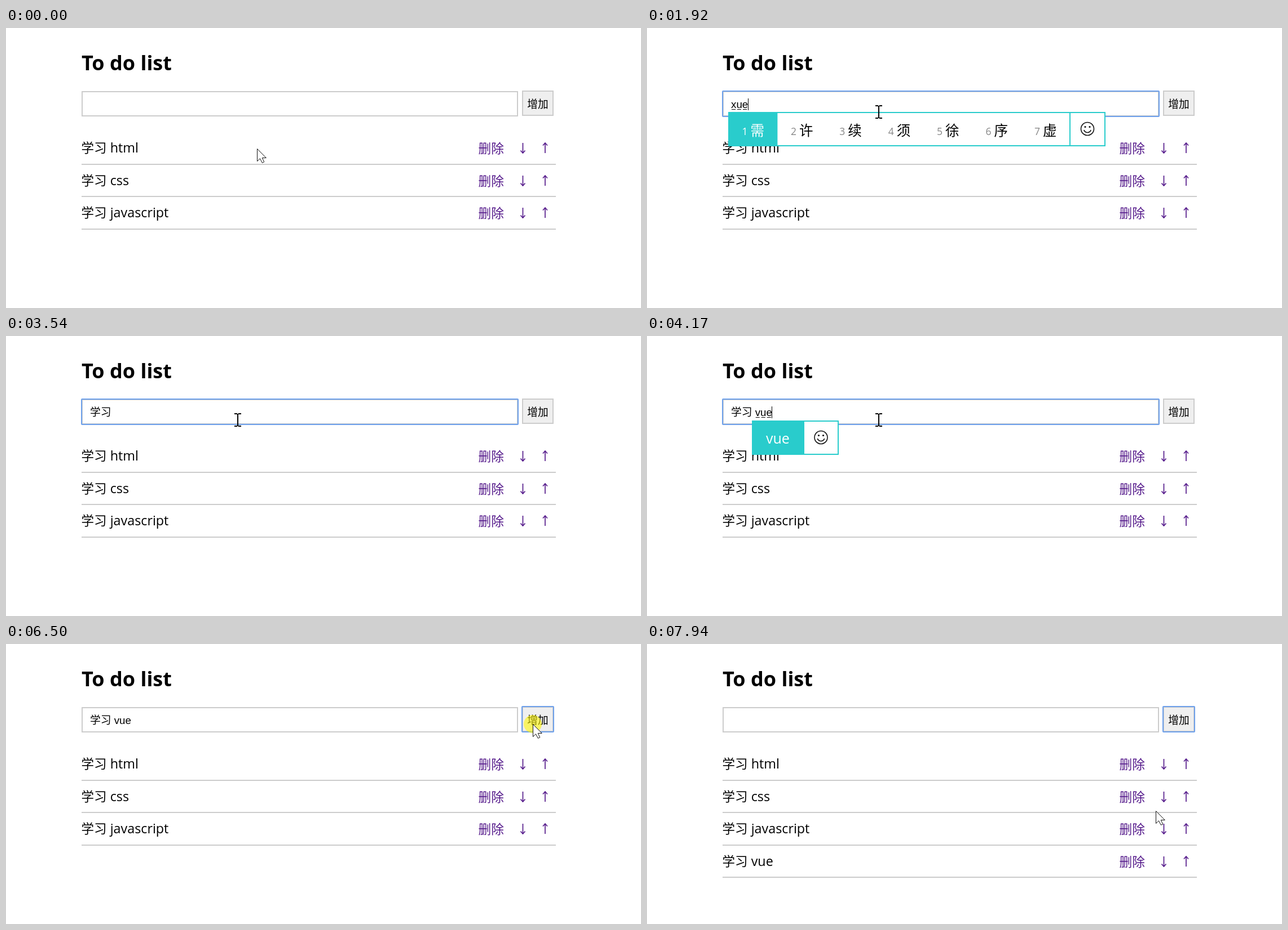
An HTML page with a canvas for the animation above (8 s loop, 1126 by 497 pixels).

```html
<!DOCTYPE html>
<html lang="zh-CN">
<head>
<meta charset="utf-8">
<title>To do list</title>
<style>
  html, body { margin: 0; width: 100%; height: 100%; overflow: hidden; background: #fff; }
  canvas { display: block; }
</style>
</head>
<body>
<canvas id="stage" width="1126" height="497"></canvas>
<script>
const ctx = document.getElementById('stage').getContext('2d');
const LOOP = 8000;
const TEAL = '#29cccc', GREY = '#cccccc', FOCUS = '#6ea1ec', LINK = '#551a8b';
const CJK = '"Noto Sans CJK SC", "Noto Sans CJK", sans-serif';
const UI = `"Open Sans", ${CJK}`;
const FIELD = `"Liberation Sans", ${CJK}`;

// Field contents: start time, committed text, text being composed, caret visible
const FIELD_STATES = [
  [0, '', '', false], [720, '', '', true], [1180, '', 'x', true],
  [1750, '', 'xu', true], [1910, '', 'xue', true],
  [2065, '', "xue'x", true], [2220, '', "xue'xi", true],
  [2680, '学习', '', true], [3040, '学习 ', '', true], [3540, '学习 ', '', false],
  [3730, '学习 ', 'v', true], [3900, '学习 ', 'vu', true], [4080, '学习 ', 'vue', true],
  [4370, '学习 vue', '', true], [4920, '学习 vue', '', false],
  [5410, '学习 vue', '', true], [5940, '学习 vue', '', false], [6610, '', '', false],
];

const POPUPS = [
  [0, null],
  [1250, () => candidates('想 下 小 新 行 学 向')],
  [1830, () => candidates('需 许 续 须 徐 序 虚')],
  [1985, () => candidates('学 血 雪 削 薛 穴 靴')],
  [2145, () => candidates('学习 学校 学些 学下 血型 学线 雪乡')],
  [2300, () => candidates('学习 学系 血洗 学 许额 薛 血')],
  [2680, null],
  [3800, modeHint],
  [3970, () => latinCandidate('vu')],
  [4170, () => latinCandidate('vue')],
  [4370, null],
];

// Pointer strokes: start, end, steps, from, control, to
const MOVES = [
  [60, 430, 7, [445, 214], [428, 188], [411, 149]],
  [5660, 6180, 9, [411, 149], [780, 88], [934, 142]],
  [6920, 7680, 13, [934, 142], [842, 258], [870, 263]],
  [7750, 7940, 4, [870, 263], [896, 303], [902, 296]],
];

const current = (states, t) => states.filter(s => s[0] <= t).pop();

function text(str, x, y, font, color = '#000', align = 'left') {
  ctx.font = font;
  ctx.fillStyle = color;
  ctx.textAlign = align;
  ctx.fillText(str, x, y);
  return ctx.measureText(str).width;
}

function box(x, y, w, h, color, fill) {
  if (fill) {
    ctx.fillStyle = fill;
    ctx.fillRect(x, y, w, h);
  }
  ctx.strokeStyle = color;
  ctx.lineWidth = 2;
  ctx.strokeRect(x + 1, y + 1, w - 2, h - 2);
}

function focusRing(x, y, w, h) {
  ctx.strokeStyle = FOCUS;
  ctx.lineWidth = 2;
  ctx.beginPath();
  ctx.roundRect(x + 1, y + 1, w - 2, h - 2, 1);
  ctx.stroke();
}

function polyline(points, close) {
  ctx.beginPath();
  points.forEach(([x, y]) => ctx.lineTo(x, y));
  if (close) ctx.closePath();
}

function arrowLink(x, y, dir) {
  ctx.strokeStyle = LINK;
  ctx.lineWidth = 1.7;
  polyline([[x, y - 9 * dir], [x, y + 9 * dir]]);
  ctx.stroke();
  polyline([[x - 4, y + 4.5 * dir], [x, y + 9 * dir], [x + 4, y + 4.5 * dir]]);
  ctx.stroke();
}

function row(label, i) {
  const top = Math.floor(i * 57.5 + 0.5);
  const y = 221 + top;
  text('学习', 133.5, y, `350 22.5px ${CJK}`);
  text(label, 184.7, y, `23.3px ${UI}`);
  text('删除', 837.5, y + 0.5, `350 22.7px ${CJK}`, LINK);
  arrowLink(916.5, y - 8, 1);
  arrowLink(956, y - 8, -1);
  ctx.fillStyle = GREY;
  ctx.fillRect(134, 241 + Math.floor(i * 57.5), 841, 2);
}

function field(t) {
  const [, done, composing, caret] = current(FIELD_STATES, t);
  const focused = t >= 720 && t < 6500;
  box(134, 112, 774, 45, GREY);
  if (focused) focusRing(133, 111, 776, 47);

  let x = 149;
  const font = `350 18.75px ${FIELD}`;
  x += text(done, x, 141.5, font);
  const start = x;
  x += text(composing, x, 141.5, font);
  if (composing) {
    ctx.strokeStyle = '#000';
    ctx.lineWidth = 1;
    ctx.setLineDash([7, 3]);
    polyline([[start + 1, 144.5], [x, 144.5]]);
    ctx.stroke();
    ctx.setLineDash([]);
  }
  if (caret) {
    ctx.fillStyle = '#000';
    ctx.fillRect(Math.floor(x), 125, 1, 21);
  }
}

function button(t) {
  box(915, 111, 56, 45, GREY, '#efefef');
  if (t >= 6500) focusRing(914, 110, 58, 47);
  text('增加', 943, 141.5, `350 18.75px ${CJK}`, '#000', 'center');
}

function smiley(x, y) {
  ctx.strokeStyle = ctx.fillStyle = '#111';
  ctx.lineWidth = 1.6;
  ctx.beginPath();
  ctx.arc(x, y, 11.5, 0, 7);
  ctx.stroke();
  ctx.beginPath();
  ctx.arc(x, y, 6.5, 0.3, Math.PI - 0.3);
  ctx.stroke();
  for (const side of [-4, 4]) {
    ctx.beginPath();
    ctx.arc(x + side, y - 3.5, 1.6, 0, 7);
    ctx.fill();
  }
}

function candidates(list) {
  const words = list.split(' ');
  const widthOf = word => 62 + 24.4 * word.length;
  const total = words.reduce((sum, word) => sum + widthOf(word), 0);
  const end = Math.round(145 + total);
  box(144, 149, end + 63 - 144, 61, TEAL, '#fff');
  let x = 145;
  words.forEach((word, i) => {
    const first = i === 0;
    if (first) {
      ctx.fillStyle = TEAL;
      ctx.fillRect(144, 149, widthOf(word) + 1, 61);
    }
    text(i + 1, x + 23.5, 190, `17.5px ${UI}`, first ? '#fff' : '#888');
    text(word, x + 38.5, 191, `24.5px ${CJK}`, first ? '#fff' : '#000');
    x += widthOf(word);
  });
  ctx.fillStyle = TEAL;
  ctx.fillRect(end - 1, 149, 2, 61);
  smiley(end + 31, 179);
}

function latinCandidate(word) {
  const font = `25px ${UI}`;
  ctx.font = font;
  const w = Math.round(ctx.measureText(word).width + 51);
  box(186, 150, w + 61, 61, TEAL, '#fff');
  ctx.fillStyle = TEAL;
  ctx.fillRect(186, 150, w, 61);
  text(word, 211, 191, font, '#fff');
  smiley(186 + w + 29.5, 180);
}

function modeHint() {
  box(146, 150, 917, 122, TEAL, '#fff');
  text('v 模式：数字、日期、计算，例如 v123、v2019.1.1、v1+2', 171, 191, `23px ${UI}`);
  ctx.fillStyle = TEAL;
  ctx.fillRect(146, 211, 64, 61);
  text('v', 171, 252, `25px ${UI}`, '#fff');
  smiley(1032, 241);
}

function pointerAt(t) {
  const move = current(MOVES, t);
  if (!move) return MOVES[0][3];
  const [start, end, steps, a, b, c] = move;
  const done = Math.floor((t - start) / (end - start) * (steps - 1) + 0.01) + 1;
  const p = Math.min(1, done / steps);
  const e = p * p * (3 - 2 * p);
  return a.map((v, i) => (1 - e) ** 2 * v + 2 * e * (1 - e) * b[i] + e * e * c[i]);
}

function pointer(t) {
  const [x, y] = pointerAt(t).map(Math.round);
  if ((t >= 630 && t < 820) || (t >= 6430 && t < 6610)) {
    ctx.fillStyle = 'rgba(255, 246, 0, 0.58)';
    ctx.beginPath();
    ctx.arc(x, y, 16, 0, 7);
    ctx.fill();
  }
  ctx.save();
  ctx.translate(x, y);
  if (x < 909 && y > 111 && y < 158) {
    ctx.fillStyle = '#000';
    for (const edge of [-12, 10]) {
      ctx.fillRect(-6, edge, 5, 2);
      ctx.fillRect(1, edge, 5, 2);
    }
    ctx.fillRect(-1, -11, 2, 22);
  } else {
    polyline([[0.5, 0.5], [0.5, 22.5], [5.5, 17.8], [9.3, 25.3], [12.8, 23.8],
      [9.3, 16.5], [16.3, 16.5]], true);
    ctx.fillStyle = '#fff';
    ctx.fill();
    ctx.strokeStyle = '#111';
    ctx.lineWidth = 1;
    ctx.stroke();
  }
  ctx.restore();
}

function draw(t) {
  ctx.fillStyle = '#fff';
  ctx.fillRect(0, 0, 1126, 497);
  text('To do list', 134, 75, `bold 36px ${UI}`);
  field(t);
  button(t);
  const items = ['html', 'css', 'javascript'];
  if (t >= 6610) items.push('vue');
  items.forEach(row);
  const popup = current(POPUPS, t)[1];
  if (popup) popup();
  pointer(t);
}

const origin = performance.now();
function tick() {
  draw((performance.now() - origin) % LOOP);
  requestAnimationFrame(tick);
}
tick();
</script>
</body>
</html>
```
